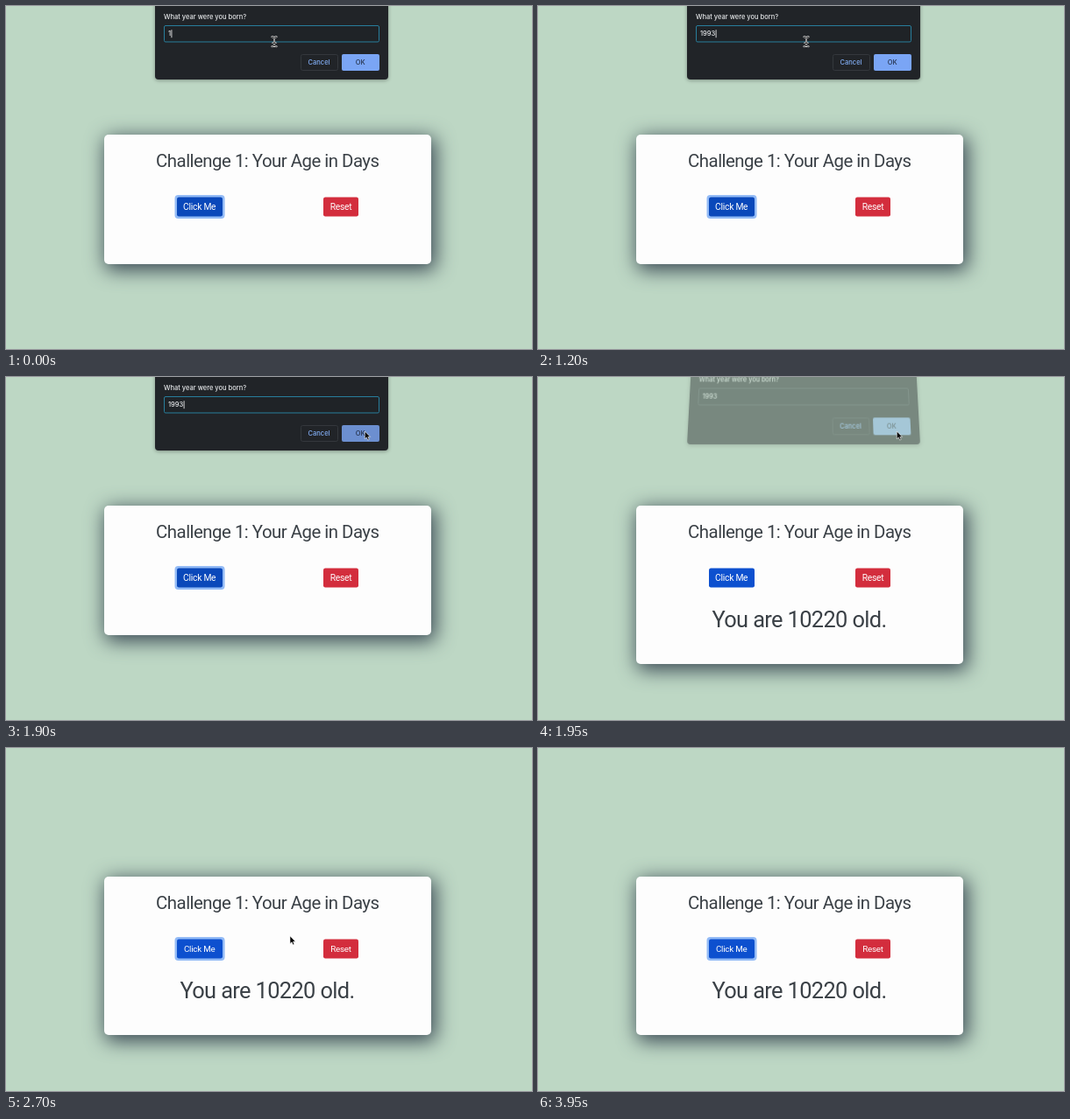
These frames come from a looping animation (600 by 392 pixels, 4000 ms). An HTML page:

```html
<!DOCTYPE html>
<html lang="en">
<head>
<meta charset="utf-8">
<title>Your age in days</title>
<style>
  html, body { margin: 0; width: 100%; height: 100%; overflow: hidden; background: #bdd7c4; }
  #stage { position: relative; width: 600px; height: 392px; overflow: hidden; background: #bdd7c4; }
  #stage > * { position: absolute; }
  #card {
    left: 111.5px; top: 147.2px; width: 373.5px; height: 148px;
    border-radius: 5px; background: #fdfdfd;
    box-shadow: 3px 5px 22px 2px #3c4b56;
  }
  #page, #pointer { left: 0; top: 0; }
  #page text {
    font-family: Roboto, "Liberation Sans", sans-serif;
    letter-spacing: -.025em; text-anchor: middle; fill: #3a4046;
  }
  #page .label { fill: #fff; }
  #dialog {
    left: 170px; top: -30px; width: 266px; height: 114px;
    border-radius: 4px; background: #212428;
    box-shadow: 0 1px 4px rgba(0, 0, 0, .35);
    transform-origin: 50% 100%;
  }
  #dialog svg { display: block; }
  #dialog text { font: 500 7.5px Inter, Roboto, sans-serif; fill: #e6e8ea; }
  #dialog .mid { text-anchor: middle; }
</style>
</head>
<body>
<div id="stage">
  <div id="card"></div>

  <svg id="page" width="600" height="392">
    <text x="298.3" y="184.3" font-size="20.4">Challenge 1: Your Age in Days</text>
    <rect id="ring" x="192.5" y="216" width="57" height="27" rx="4" fill="#93bbf6"/>
    <rect id="click" x="195" y="218.5" width="52" height="22" rx="2.2"/>
    <rect x="362" y="218.5" width="40" height="22" rx="2.2" fill="#d32d3d"/>
    <text class="label" x="220.7" y="233">Click Me</text>
    <text class="label" x="382" y="233">Reset</text>
    <text id="result" x="298" y="286" font-size="25.4">You are 10220 old.</text>
  </svg>

  <div id="dialog">
    <svg width="266" height="114" viewBox="170 -30 266 114">
      <text x="180" y="15">What year were you born?</text>
      <rect id="field" x="180.5" y="22.5" width="245" height="18.5" rx="1.5" fill="#1f2327"/>
      <text id="year" x="185" y="34.2"></text>
      <rect id="caret" y="27.2" width=".8" height="9" fill="#fff"/>
      <rect x="336.5" y="55.5" width="42" height="18" rx="2" fill="none" stroke="#34383d"/>
      <text class="mid" x="357" y="67.2" style="fill:#82aef5">Cancel</text>
      <rect id="ok" x="383" y="55" width="43" height="19" rx="2"/>
      <text class="mid" x="404.3" y="67.2" style="fill:#26334d">OK</text>
    </svg>
  </div>

  <svg id="pointer" width="600" height="392">
    <path id="arrow" d="M0 0V8.8L2 7L3.4 10.1L4.9 9.4L3.6 6.4H6.3Z" fill="#000" stroke="#fff" stroke-width=".6" stroke-linejoin="round"/>
    <g id="beam" fill="none" stroke-linecap="round">
      <path id="bar" d="M-2.5 -5.5Q0 -5.5 0 -4Q0 -5.5 2.5 -5.5M0 -4V4M-2.5 5.5Q0 5.5 0 4Q0 5.5 2.5 5.5M-1.5 1.5H1.5" stroke="#fff" stroke-width="2"/>
      <use href="#bar" style="display:none"/>
    </g>
  </svg>
</div>

<script>
  const LOOP = 4000, STEP = 50;
  const CLOSING = 1900, SUBMIT = 1950, CLOSED = 2050, LEAVE = 3500;
  const YEAR = '1993', FIRST_KEY = 750, KEY_GAP = 200;

  const $ = id => document.getElementById(id);
  const show = (el, on) => { el.style.display = on ? '' : 'none'; };
  const progress = (t, from, to) => Math.min(1, Math.max(0, (t - from) / (to - from)));
  const mix = (a, b, k) => a + (b - a) * k;
  const labels = document.querySelectorAll('.label');

  const linear = k => k;
  const easeOut = k => 1 - (1 - k) ** 2.5;
  const smooth = k => k * k * (3 - 2 * k);

  // The pointer goes to OK, down to the result, back up and away.
  const home = { x: 306, y: 40.8 };
  const legs = [
    { from: 1350, to: 1700, x: 409.3, y: 62, easeX: smooth, easeY: smooth },
    { from: 1950, to: 2600, x: 323.5, y: 279, easeX: easeOut, easeY: linear },
    { from: 2600, to: 3100, x: 328, y: 129, easeX: smooth, easeY: easeOut },
    { from: 3100, to: 3450, x: 344, y: 54, easeX: linear, easeY: linear }
  ];

  function pointerAt(t) {
    return legs.reduce((p, leg) => {
      const k = progress(t, leg.from, leg.to);
      return { x: mix(p.x, leg.x, leg.easeX(k)), y: mix(p.y, leg.y, leg.easeY(k)) };
    }, home);
  }

  function drawDialog(t, hover) {
    const dialog = $('dialog');
    const open = t < SUBMIT;
    show(dialog, t < CLOSED);
    if (t >= CLOSED) return;
    const k = progress(t, CLOSING, CLOSING + 150);
    const tilt = 3 * k;
    dialog.style.opacity = (1 - k) ** 2;
    dialog.style.transform = k
      ? `translateY(${-7 * tilt}px) scaleY(${1 + .085 * tilt}) perspective(400px) rotateX(${10 * tilt}deg)`
      : 'none';
    const keys = Math.floor((t - FIRST_KEY) / KEY_GAP) + 1;
    $('year').textContent = YEAR.slice(0, 1 + Math.max(0, keys));
    $('caret').setAttribute('x', 185.4 + $('year').getComputedTextLength());
    show($('caret'), open);
    $('field').setAttribute('stroke', open ? '#287e9c' : '#3b4146');
    $('ok').setAttribute('fill', !open ? '#86b2ef' : hover ? '#6c8fd0' : '#7aa5f5');
  }

  function drawPage(t) {
    const done = t >= SUBMIT;
    $('card').style.height = (done ? 181 : 148) + 'px';
    show($('result'), done);
    $('ring').style.opacity = done ? progress(t, 2000, 2150) : 1;
    $('click').setAttribute('fill', done ? '#0d50cf' : '#0a48ba');
    labels.forEach(el => el.setAttribute('font-size', t < CLOSED ? 10.3 : 9.8));
  }

  function drawPointer(t, { x, y }) {
    const overField = t < SUBMIT && y < 41;
    const overResult = t >= SUBMIT && y > 263;
    const beam = overField || overResult;
    const place = `translate(${x} ${y})`;
    $('arrow').setAttribute('transform', place);
    $('beam').setAttribute('transform', place);
    show($('pointer'), t < LEAVE);
    show($('arrow'), !beam);
    show($('beam'), beam);
  }

  // Dark core on top of the white outline of the text pointer.
  const core = $('bar').cloneNode();
  core.removeAttribute('id');
  core.setAttribute('stroke', '#111');
  core.setAttribute('stroke-width', .9);
  $('beam').querySelector('use').replaceWith(core);

  function draw(now) {
    const t = Math.floor((now % LOOP) / STEP) * STEP;
    const p = pointerAt(t);
    drawPage(t);
    drawDialog(t, p.x > 383 && p.y > 55);
    drawPointer(t, p);
  }

  const start = performance.now();
  function tick() {
    draw(performance.now() - start);
    requestAnimationFrame(tick);
  }
  tick();
</script>
</body>
</html>
```
